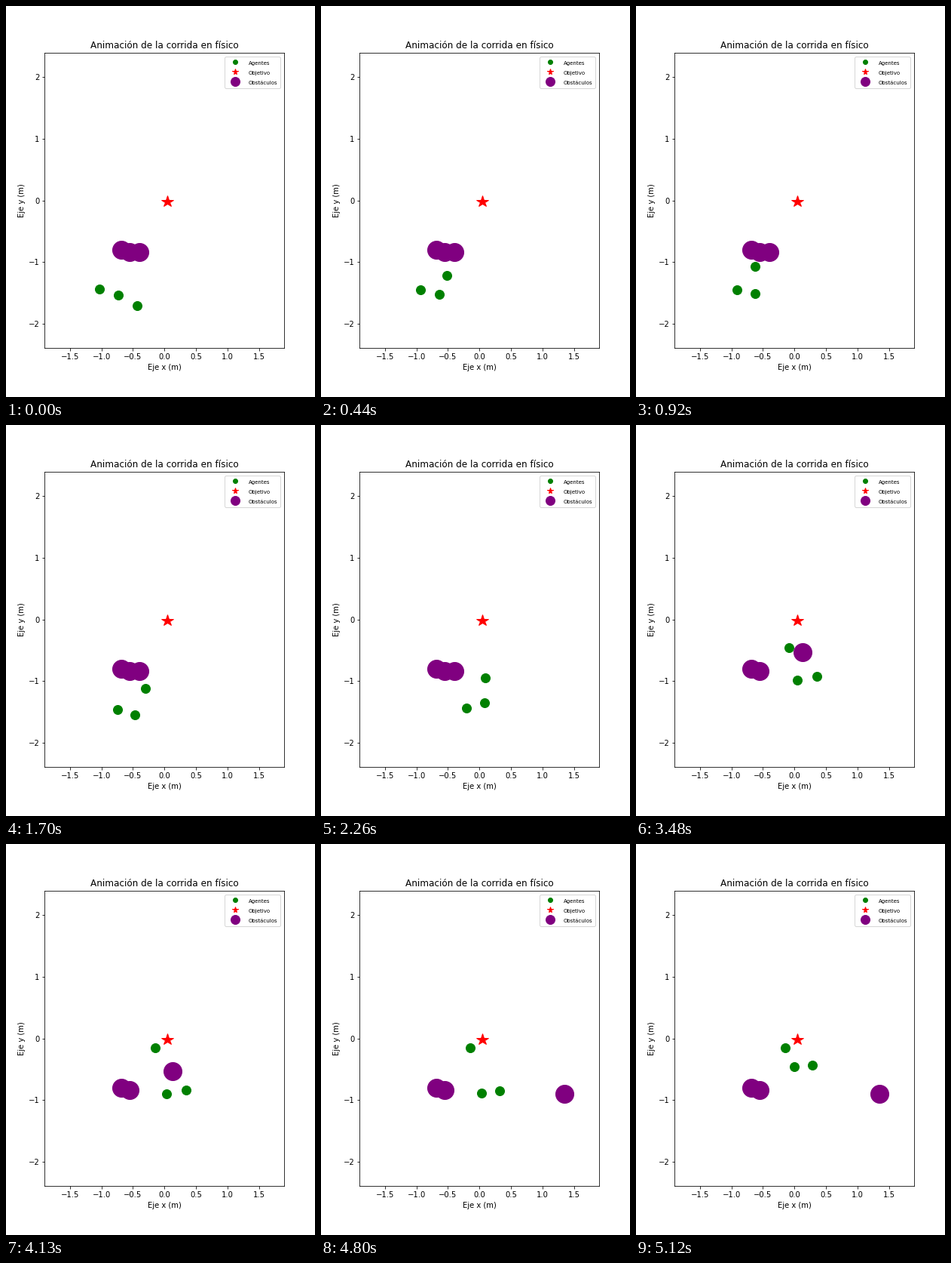
Recreate the animation shown at these times as a matplotlib script. Size 410 by 518 pixels, loop 5140 ms.

```python
import numpy as np
import matplotlib.pyplot as plt
from matplotlib.animation import FuncAnimation

DPI, STEP, LOOP = 72, 20, 5140
W, H = 410, 518

# Key points {time in ms: x + yj in metres}
REAR = {0: -1.03-1.44j, 540: -.91-1.45j, 1100: -.91-1.45j,
        1700: -.745-1.465j, 2260: -.21-1.44j, 2940: .08-1.15j,
        3800: .03-.90j, 4820: .03-.89j, 5120: -.46j}
LEAD = {0: -.43-1.71j, 300: -.39-1.39j, 540: -.61-1.09j, 1100: -.64-1.06j,
        1700: -.30-1.12j, 2260: .09-.95j, 3240: -.03-.71j, 3780: -.15-.15j}
# The third agent keeps beside the rear one, swinging round as they turn
BESIDE = {0: .30-.10j, 920: .28-.06j, 1700: .28-.09j,
          2260: .29+.08j, 4130: .31+.06j, 5120: .28+.02j}

FIXED = [-.685-.80j, -.55-.84j]
MOVED = {2400: -.40-.84j, 2560: .13-.53j, 4440: .13-.53j, 4640: 1.35-.90j}
GOAL = .044-.018j


def glide(keys, t):
    return np.interp(t, list(keys), list(keys.values()))


def agent_spots(t):
    rear = glide(REAR, t)
    return np.array([rear, rear + glide(BESIDE, t), glide(LEAD, t)])


def obstacle_spots(t):
    return np.array([*FIXED, glide(MOVED, t)])


def markers(spots, shape, color, size, label):
    return ax.plot(np.real(spots), np.imag(spots), shape, color=color,
                   ms=size, label=label)[0]


fig, ax = plt.subplots(figsize=(W / DPI, H / DPI), dpi=DPI)
fig.subplots_adjust(left=51.3 / W, right=369.36 / W,
                    bottom=64.8 / H, top=456.2 / H)
ax.set(xlim=(-1.9, 1.9), ylim=(-2.4, 2.4),
       xticks=np.arange(-1.5, 2, .5), yticks=range(-2, 3),
       xlabel="Eje x (m)", ylabel="Eje y (m)",
       title="Animación de la corrida en físico")

agents = markers(agent_spots(0), "o", "green", 12, "Agentes")
markers([GOAL], "*", "red", 16, "Objetivo")
obstacles = markers(obstacle_spots(0), "o", "purple", 24, "Obstáculos")

legend = ax.legend(loc="upper right", markerscale=.5)
plt.setp(legend.get_texts(), fontsize=7)


def update(i):
    t = i * STEP
    for dots, spots in ((agents, agent_spots(t)),
                        (obstacles, obstacle_spots(t))):
        dots.set_data(spots.real, spots.imag)
    return agents, obstacles


anim = FuncAnimation(fig, update, frames=LOOP // STEP, interval=STEP,
                     repeat=True, repeat_delay=0)
plt.show()
```
